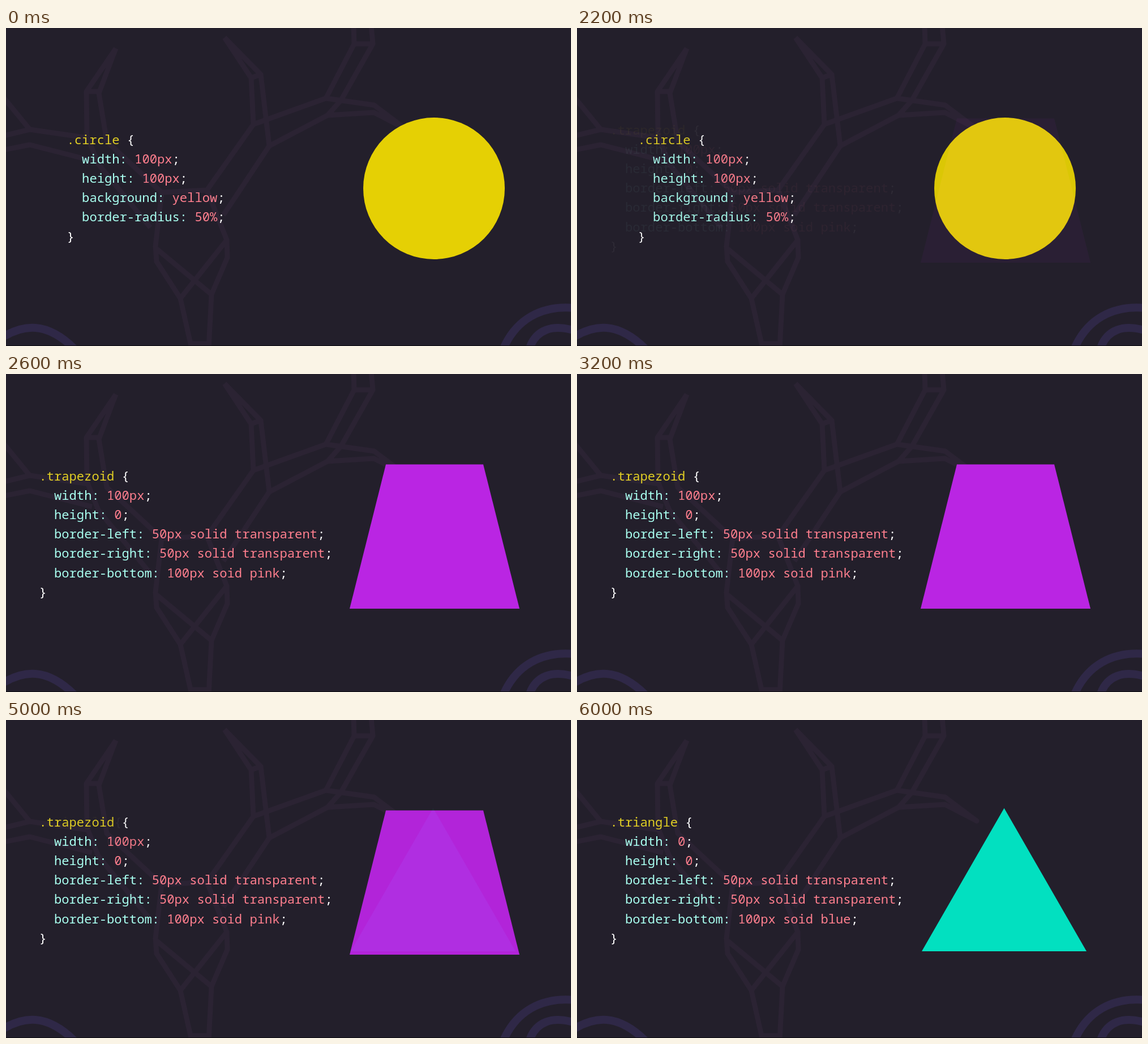
Animation, 998 px wide and 561 px high, one loop 7200 ms. Source, as an HTML page:

```html
<!DOCTYPE html>
<html lang="en">
<head>
<meta charset="utf-8">
<title>CSS shapes</title>
<style>
  html, body { margin: 0; width: 100%; height: 100%; overflow: hidden; background: #231f2b; }
  svg { display: block; width: 100%; height: 100%; }
  text { font: 22.15px "Roboto Mono", "Noto Sans Mono", "DejaVu Sans Mono", monospace; fill: #fff; }
  .selector { fill: #e2cf24; }
  .property { fill: #a9fff0; }
  .value { fill: #ff7f8e; }
  .antlers { fill: none; stroke: #2b2333; stroke-width: 9; stroke-linejoin: round; }
  .rings { fill: none; stroke: #2f2847; stroke-width: 14; }
</style>
</head>
<body>
<svg viewBox="0 0 998 561">
  <defs>
    <g id="backdrop">
      <rect width="998" height="561" fill="#231f2b"/>
      <path class="antlers" d="
        M194 36L142 112L143 190L163 240L255 352
        M194 36L164 115L178 200L275 290M142 112H164
        M-4 123L42 179L-4 190M42 179L146 194M-4 215L42 206L152 234
        M386 17L450 82L465 208L384 330
        M386 17L433 88L437 170L355 286M433 88L450 82
        M437 170L565 124L615 28L614 -5M465 208L568 154L592 127L648 28L645 -5M615 28H648
        M565 124L650 136L706 178L650 149L568 154
        M275 290L355 286L390 374L391 405L363 470L358 566
        M275 290L264 385L266 412L308 477L328 566M328 557H358
        M264 388L363 470M390 374L308 477"/>
      <path class="rings" d="M-10 548C30 522 72 517 122 567
        M878 567C900 515 945 488 1005 494
        M924 567C935 532 965 522 1005 534"/>
      <rect y="560" width="998" height="1" fill="#0e0d12"/>
    </g>
  </defs>
</svg>
<script>
const LOOP = 7200, STEP = 200, FADE = 270;
const LINE = 34.1, INDENT = 26.6;
const sides = "border-left: 50px solid transparent|border-right: 50px solid transparent";

const scenes = [
  { start: -FADE, x: 107.5, y: 205, name: ".circle",
    rules: "width: 100px|height: 100px|background: yellow|border-radius: 50%",
    shape: '<circle cx="756" cy="283" r="125" fill="#e5d004"/>' },
  { start: 2187, x: 58.4, y: 188, name: ".trapezoid", shapeEnd: 5200,
    rules: `width: 100px|height: 0|${sides}|border-bottom: 100px soid pink`,
    shape: '<path d="M671 159.5H843L907 414H607Z" fill="#ba25e3"/>' },
  { start: 4987, x: 58.4, y: 188, name: ".triangle",
    rules: `width: 0|height: 0|${sides}|border-bottom: 100px soid blue`,
    shape: '<path d="M754.5 155.5L900 408H609Z" fill="#02e0c0"/>' }
];

const span = (type, text) => `<tspan class="${type}">${text}</tspan>`;

function codeLines({ x, y, name, rules }) {
  const body = rules.split("|").map(rule => {
    const [property, value] = rule.split(": ");
    return `${span("property", property + ":")} ${span("value", value)};`;
  });
  const lines = [`${span("selector", name)} {`, ...body, "}"];
  return lines.map((line, i) => {
    const indent = i > 0 && i <= body.length ? INDENT : 0;
    return `<text x="${x + indent}" y="${y + i * LINE}">${line}</text>`;
  }).join("");
}

// Every scene is opaque, so fading one in is a linear crossfade.
const svg = document.querySelector("svg");
for (const scene of scenes) {
  svg.insertAdjacentHTML("beforeend",
    `<g><use href="#backdrop"/>${codeLines(scene)}<g>${scene.shape}</g></g>`);
  scene.node = svg.lastElementChild;
  scene.shapeNode = scene.node.lastElementChild;
}

function draw(now) {
  const t = Math.floor(now % LOOP / STEP) * STEP;
  for (const { start, shapeEnd = LOOP, node, shapeNode } of scenes) {
    node.setAttribute("opacity", Math.min(1, Math.max(0, (t - start) / FADE)));
    shapeNode.setAttribute("opacity", t < shapeEnd ? 1 : 0);
  }
}

const begin = performance.now();
function tick() {
  draw(performance.now() - begin);
  requestAnimationFrame(tick);
}
tick();
</script>
</body>
</html>
```
